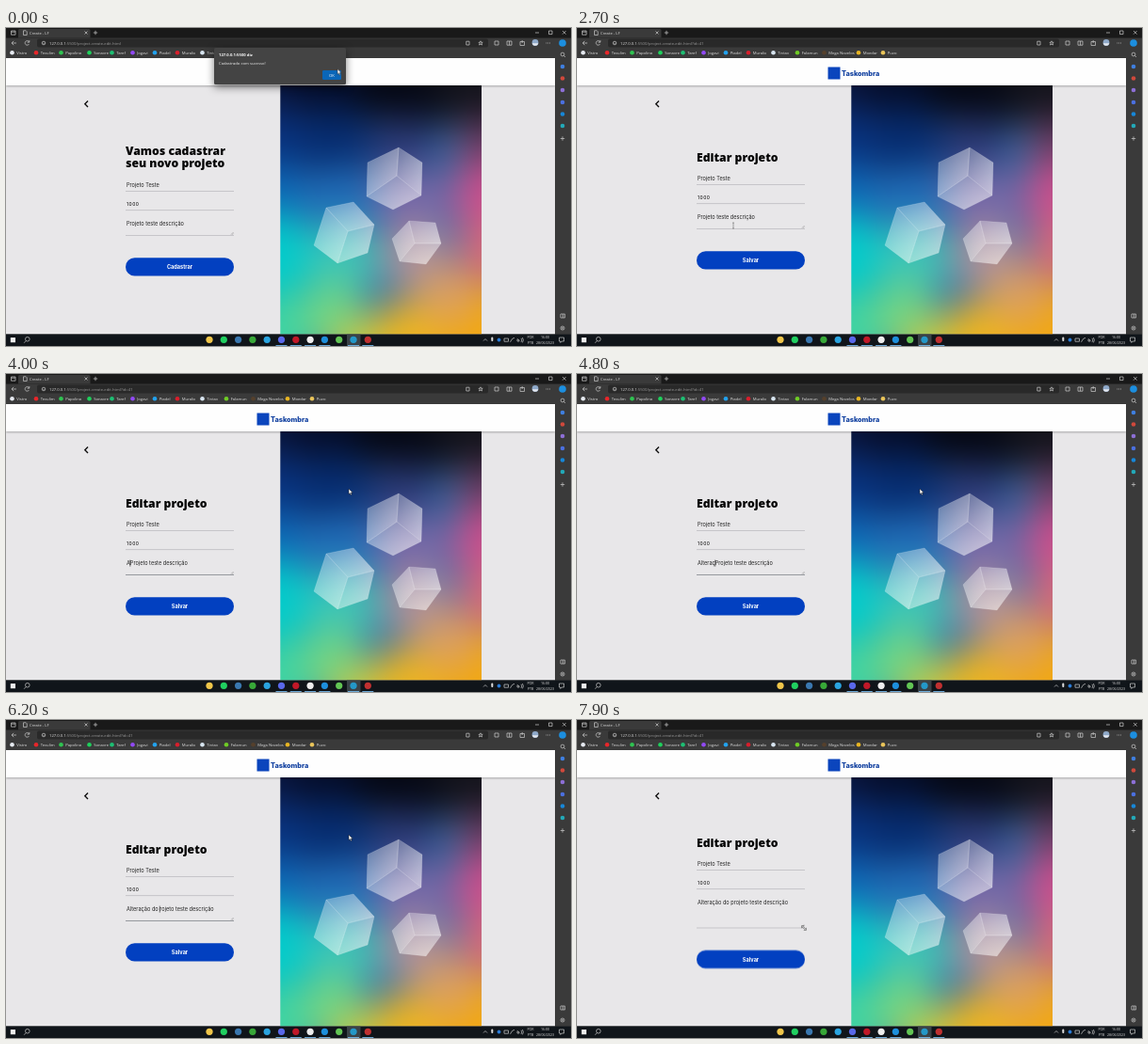
These frames come from a looping animation (600 by 338 pixels, 8 s). An HTML page:

```html
<!DOCTYPE html>
<html lang="pt-BR">
<head>
<meta charset="utf-8">
<title>Projetos</title>
<style>
html, body { margin: 0; width: 100%; height: 100%; overflow: hidden; background: #111; }
svg { display: block; width: 100vw; height: 100vh; }
text { font-family: Inter, "Open Sans", sans-serif; white-space: pre; }
.ui text, text.ui { font: 4.2px "Open Sans", "Noto Sans", sans-serif; fill: #ddd; }
.title { font: 800 12.2px "Open Sans", "Noto Sans", sans-serif; fill: #050505; }
.field { font-size: 5.6px; fill: #222; }
.old { font-size: 4.9px; font-weight: 500; letter-spacing: .5px; }
.label { font-size: 5.2px; fill: #aaa; }
.btn { font-size: 5.6px; font-weight: 700; fill: #fff; text-anchor: middle; }
.line { stroke: #bdbdc0; stroke-width: .8; }
.stroke { fill: none; stroke: #ccc; stroke-width: .7; }

/* scenes switch hard, so they share one stepped clock */
.step { opacity: 0; animation: 8s step-end infinite; }
.create { animation-name: create; }
.dialog { animation-name: dialog; }
.list { animation-name: list; }
.edit { animation-name: edit; }
.focus { animation-name: focus; }
.arrow { animation-name: arrow; }
.hand { animation-name: hand; }
.beam { animation-name: beam; }
.sizer { animation-name: sizer; }
@keyframes create { 0% { opacity: 1 } 6.25% { opacity: 0 } }
@keyframes dialog { 0% { opacity: 1 } 3.75% { opacity: 0 } }
@keyframes list { 0% { opacity: 0 } 6.25% { opacity: 1 } 24.3% { opacity: 0 } }
@keyframes edit { 0% { opacity: 0 } 24.3% { opacity: 1 } }
@keyframes focus { 0% { opacity: 0 } 40% { opacity: 1 } 93.75% { opacity: 0 } }
@keyframes arrow {
  0% { opacity: 1 } 17% { opacity: 0 } 24.3% { opacity: 1 }
  31.5% { opacity: 0 } 43.2% { opacity: 1 } 91.8% { opacity: 0 }
}
@keyframes hand { 0% { opacity: 0 } 17% { opacity: 1 } 24.3% { opacity: 0 } }
@keyframes beam { 0% { opacity: 0 } 31.5% { opacity: 1 } 43.2% { opacity: 0 } }
@keyframes sizer { 0% { opacity: 0 } 91.8% { opacity: 1 } }

.up { animation: up 8s linear infinite; }
.down { animation: down 8s linear infinite; }
@keyframes up {
  0%, 15% { transform: translateY(7px) }
  15.01%, 93.75% { transform: none }
  98.75%, 100% { transform: translateY(-7px) }
}
@keyframes down {
  0%, 15% { transform: translateY(7px) }
  15.01%, 93.75% { transform: none }
  98.75%, 100% { transform: translateY(7.5px) }
}
.pointer { animation: move 8s ease-in-out infinite; }
@keyframes move {
  0%, 5% { transform: translate(352px, 43.5px) }
  18%, 24.3% { transform: translate(433px, 132px) }
  32.5%, 34.4% { transform: translate(166px, 210px) }
  38.75%, 41.25% { transform: translate(128.5px, 202px) }
  47.5%, 80% { transform: translate(364px, 122px) }
  85.6%, 87.5% { transform: translate(175px, 258px) }
  91.9%, 93.75% { transform: translate(241px, 213px); animation-timing-function: linear }
  98.75%, 100% { transform: translate(241px, 221px) }
}
</style>
</head>
<body>
<svg viewBox="0 0 600 338" preserveAspectRatio="none">
  <defs>
    <filter id="soft" filterUnits="userSpaceOnUse" x="200" y="-30" width="400" height="450" color-interpolation-filters="sRGB">
      <feGaussianBlur stdDeviation="19"/>
    </filter>
    <filter id="shade" x="-10%" y="-30%" width="120%" height="170%" color-interpolation-filters="sRGB">
      <feDropShadow dx="0" dy="1" stdDeviation="1.1" flood-opacity=".28"/>
    </filter>
    <filter id="float" x="-20%" y="-50%" width="140%" height="220%" color-interpolation-filters="sRGB">
      <feDropShadow dx="0" dy="3" stdDeviation="4" flood-opacity=".5"/>
    </filter>
    <linearGradient id="glass" x1="0" y1="0" x2="1" y2="1">
      <stop offset="0" stop-color="#fff" stop-opacity=".28"/>
      <stop offset="1" stop-color="#fff" stop-opacity=".6"/>
    </linearGradient>
    <clipPath id="frame"><path d="M291.3 61H505V325.5H291.3z"/></clipPath>
  </defs>

  <!-- page -->
  <rect y="32" width="583" height="293.5" fill="#e8e7e9"/>
  <g clip-path="url(#frame)">
    <g id="blobs" filter="url(#soft)"><rect x="220" y="0" width="360" height="400" fill="#3a70a8"/></g>
    <g id="cubes" stroke="#fff" stroke-opacity=".3" stroke-width=".5"></g>
  </g>
  <path d="M87 77.5 83.8 80.8 87 84.1" fill="none" stroke="#111" stroke-width="1.4"/>

  <!-- form -->
  <g class="step create">
    <text class="title" x="127" y="135.2">Vamos cadastrar</text>
    <text class="title" x="127" y="148.2">seu novo projeto</text>
  </g>
  <g class="up">
    <text class="title step edit" x="127" y="141.5">Editar projeto</text>
    <text class="field" x="128" y="162">Projeto Teste</text>
    <path class="line" d="M127 166.5H242M127 186.6H242"/>
    <text class="field old" x="128" y="182.3">1000</text>
    <text class="field" x="128" y="203"><tspan id="typed"></tspan><tspan id="rest">Projeto teste descrição</tspan></text>
    <path id="caret" d="M0 197.6V204.6" stroke="#111" stroke-width=".6"/>
  </g>
  <g class="down">
    <path class="line" d="M127 213.5H242"/>
    <path class="step focus" d="M127 213.5H242" stroke="#8b8e93" stroke-width=".8"/>
    <path d="M239 212.6 241.5 210.1M240.5 212.6 241.5 211.6" stroke="#777" stroke-width=".5"/>
    <rect x="127" y="237.3" width="115" height="19.2" rx="9.6" fill="#0240c0"/>
    <text class="btn step create" x="184.5" y="249">Cadastrar</text>
    <text class="btn step edit" x="184.5" y="249">Salvar</text>
  </g>

  <!-- project list -->
  <g class="step list">
    <rect y="61" width="583" height="264.5" fill="#e8e7e9"/>
    <text class="title" x="78" y="93.5" style="font-size:11.5px">Projetos</text>
    <rect x="461" y="79.5" width="44" height="12.6" rx="6.3" fill="#0240c0"/>
    <text class="btn" x="483" y="87.5" style="font-size:4.6px">Novo Projeto</text>
    <rect x="78" y="106" width="427" height="40" rx="5" fill="#fcfcfc" filter="url(#shade)"/>
    <text class="label" x="88" y="118.7">Título</text>
    <text class="label" x="318" y="118.7">Custo Total</text>
    <text class="label" x="432.5" y="118.7">Ações</text>
    <text class="field" x="88" y="128.4" style="font-size:5px;font-weight:600">Projeto Teste</text>
    <text class="field" x="88" y="135.8" style="font-size:5px">Projeto teste descrição</text>
    <text class="field" x="318" y="132" style="font-size:4.9px;font-weight:600">1000</text>
    <path d="M432.5 134 433.2 131.6 437.4 127.4 439.2 129.2 435 133.4z" fill="#0c47b8"/>
    <path d="M444.6 128.1H450.2M446.4 127.2H448.4M445.2 128.6V133.2H449.6V128.6M446.8 130V132M448 130V132"
      fill="none" stroke="#d6303f" stroke-width=".9"/>
  </g>

  <!-- header -->
  <rect y="32" width="583" height="29" fill="#fefefe" filter="url(#shade)"/>
  <rect x="266.5" y="41.5" width="13" height="13" fill="#0b45bd"/>
  <text x="281" y="50.7" fill="#0c3c9e" style="font-size:7.3px;font-weight:800">Taskombra</text>
  <g class="step list" text-anchor="end">
    <text x="490" y="45.8" style="font-size:4.4px;font-weight:700">Morvel</text>
    <text x="490" y="50.6" fill="#444" style="font-size:3.8px">Desenvolvedor</text>
    <circle cx="500" cy="47" r="5.2" fill="#6f93ad"/>
    <path d="M495.2 49a5.2 5.2 0 0 0 9.6 0z" fill="#3d5a42"/>
    <path d="M498 50.5v-2.5a2 2 0 0 1 4 0v2.5z" fill="#26313c"/>
  </g>

  <!-- browser -->
  <g class="ui">
    <rect width="600" height="10.5" fill="#191919"/>
    <path d="M0 10.5H600V326H583V32H0z" fill="#3a3a3a"/>
    <path d="M13 10.5V2.5q0-1.5 1.5-1.5H88q1.5 0 1.5 1.5V10.5z" fill="#3a3a3a"/>
    <rect x="33" y="11.6" width="479" height="8.8" rx="2" fill="#292929"/>
    <path class="stroke" d="M5.5 3H10V7.2H5.5zM5.5 4.2H10M18.5 2.8H21.2L22.2 3.8V7.5H18.5zM83.5 3.5 86.5 6.5M86.5 3.5 83.5 6.5M92.8 5H97.2M95 2.8V7.2
      M562 5H566M576.5 3H580V6.6H576.5zM591 3 594.6 6.6M594.6 3 591 6.6
      M11 16H6M8.2 13.8 6 16 8.2 18.2M24.6 15A2.3 2.3 0 1 0 24.5 17M24.8 13V15.2H22.6
      M502 15.3H503.4L504 13.8 504.6 15.3H506.2L505 16.4 505.5 18 504 17 502.5 18 503 16.4z
      M532 14H537V18.2H532zM534.5 14V18.2M546 14.5H550.5V18.5H546zM548.2 16V13"/>
    <circle class="stroke" cx="40" cy="16" r="1.8"/><path class="stroke" d="M40 15.8V17"/>
    <path class="stroke" d="M488.8 14.2H492V18H488.8zM519 14H523V18H519z"/>
    <circle cx="562" cy="15.5" r="3.4" fill="#8fa9c9"/><path d="M558.7 16.2a3.4 3.4 0 0 0 6.6 0z" fill="#e5e8ee"/>
    <path d="M573.5 16H578" stroke="#ccc" stroke-dasharray=".8 1" stroke-width=".8"/>
    <g class="step list">
      <text x="25" y="6.6">List - LF</text>
      <text x="46" y="17.5">127.0.0.1<tspan fill="#999">:5500/list.html</tspan></text>
    </g>
    <g class="step create">
      <text x="25" y="6.6">Create - LF</text>
      <text x="46" y="17.5">127.0.0.1<tspan fill="#999">:5500/project-create-edit.html</tspan></text>
    </g>
    <g class="step edit">
      <text x="25" y="6.6">Create - LF</text>
      <text x="46" y="17.5">127.0.0.1<tspan fill="#999">:5500/project-create-edit.html?id=41</tspan></text>
    </g>
    <g id="marks"></g>
    <g id="side"></g>
    <path class="stroke" d="M592.3 29.2 594 31M588.8 117.5H593.2M591 115.3V119.7M589 304H593.5V308H589zM591.5 304V308"/>
    <circle class="stroke" cx="591" cy="28" r="1.9"/>
    <circle class="stroke" cx="591" cy="319" r="2"/><circle class="stroke" cx="591" cy="319" r=".6"/>
  </g>

  <!-- taskbar -->
  <g class="ui">
    <rect y="325.6" width="600" height="12.4" fill="#10151a"/>
    <rect x="362" y="325.6" width="14.5" height="12.4" fill="#3a4247"/>
    <rect x="4.8" y="329" width="5.2" height="5.2" fill="#eee"/>
    <circle class="stroke" cx="22.8" cy="330.7" r="2.3" stroke="#fff"/>
    <path class="stroke" d="M21.2 332.5 19.2 334.7M507 332.5 509 330.5 511 332.5M529 330H533.5V333.2H529zM543 333V330.6L545 331.8V333zM547 329.8q1.6 2 0 4M548.4 329q2 2.8 0 5.4M587.5 329H592.5V333H590L588.8 334.4V333H587.5z"/>
    <rect x="515.3" y="328.6" width="2" height="4.5" rx="1" fill="#ddd"/>
    <circle cx="523.5" cy="331.5" r="1.9" fill="#2b7bd6"/>
    <path class="stroke" d="M535.5 333.8q1.8-4.5 4.5-4.5"/>
    <path id="active" stroke="#76b9ed" stroke-width=".9"/>
    <g id="apps"></g>
    <g text-anchor="middle">
      <text x="557" y="330.4" style="font-size:3.6px">POR</text>
      <text x="557" y="335.8" style="font-size:3.6px">PTB</text>
      <text x="572.5" y="330.4" style="font-size:3.6px">16:00</text>
      <text x="572.5" y="335.8" style="font-size:3.6px">28/06/2023</text>
    </g>
  </g>

  <!-- alert -->
  <g class="step dialog ui">
    <rect x="221" y="21" width="140" height="39" rx="1.5" fill="#444" filter="url(#float)"/>
    <text x="226" y="30.3" style="font-weight:700;fill:#fff">127.0.0.1:5500 diz</text>
    <text x="226" y="39.3" style="fill:#eee">Cadastrado com sucesso!</text>
    <rect x="336" y="45" width="20" height="10" rx="1.2" fill="#0a66b8"/>
    <text x="346" y="51.6" text-anchor="middle" style="fill:#fff">OK</text>
  </g>

  <g class="pointer" stroke="#222" stroke-width=".5" fill="#fff">
    <path class="step arrow" d="M0 0V5.6L1.3 4.5 2.2 6.5 3.1 6.1 2.3 4.1H4z"/>
    <path class="step hand" d="M-.3 0q.7-.8 1.3 0V2.6L3.2 3.1Q4 3.4 3.8 4.4L3.2 6.6H.2L-1.9 4.1Q-1.5 3-.3 4z"/>
    <path class="step beam" d="M-1-3H1M0-3V3M-1 3H1" stroke="#555"/>
    <path class="step sizer" d="M-2.4-2.4H-.2L-.9-1.6 1.6.9 2.4.2V2.4H.2L.9 1.6-1.6-.9-2.4-.2z"/>
  </g>
</svg>
<script>
const $ = id => document.getElementById(id);
const fill = (id, items, draw) => $(id).insertAdjacentHTML('beforeend', items.map(draw).join(''));
const dot = (x, y, r, color) => `<circle cx="${x}" cy="${y}" r="${r}" fill="${color}"/>`;

fill('blobs', [
  [285, 50, 54, '#0a1640'], [355, 50, 56, '#050d2a'], [430, 50, 62, '#050814'], [512, 55, 58, '#14141c'],
  [285, 122, 38, '#08327f'], [350, 125, 40, '#062c70'], [422, 130, 36, '#2a3a78'], [512, 128, 34, '#6a3a60'],
  [285, 175, 32, '#0a68b8'], [355, 182, 36, '#1f6cb8'], [430, 185, 38, '#7868a8'], [514, 180, 40, '#cc4e8c'],
  [283, 242, 46, '#00cccc'], [357, 245, 40, '#3cc4b8'], [435, 242, 36, '#b0909a'], [515, 235, 34, '#dc6878'],
  [285, 325, 44, '#3cd4a4'], [345, 302, 36, '#6cd488'], [375, 340, 34, '#b8cc50'], [435, 332, 46, '#ecb420'],
  [512, 325, 55, '#f2a810'], [470, 285, 32, '#dca060']
], b => dot(...b));

// each cube: six outline corners, then the inner corner
fill('cubes', [
  ['417,127', '442,143', '441,178', '411,193', '383,179', '384,143', '415,157'],
  ['340,191', '369,185', '391,209', '384,239', '352,250', '327,231', '363,216'],
  ['428,205', '456,207', '462,229', '446,251', '418,248', '410,224', '434,229']
], c => [0, 2, 4].map(i =>
  `<polygon points="${[c[i], c[i + 1], c[(i + 2) % 6], c[6]].join(' ')}" fill="url(#glass)"/>`).join(''));

fill('marks', [
  [6.5, 'Vistro', '#e6eaf0'], [32, 'Tevulim', '#e8262a'], [58.5, 'Papolino', '#2fc351'], [88.5, 'Sonavre', '#1ed05c'],
  [112.5, 'Taref', '#1dbf73'], [134.5, 'Jogavi', '#9149f5'], [158, 'Piadel', '#22a2ee'], [182, 'Muralix', '#d81e2c'],
  [208.5, 'Tintav', '#d7e4ef'], [234, 'Falamun', '#6fcc25'], [262.5, 'Mega Novelos', '#55402c'],
  [299, 'Moedar', '#e8b522'], [325, 'Puvo', '#e9c45a']
], ([x, name, color]) => dot(x, 26.2, 2.3, color) + `<text x="${x + 4.7}" y="27.7">${name}</text>`);

fill('side', [
  [16, '#1c8fe0'], [41, '#3f7fe0'], [53.5, '#d0493c'], [66, '#8d6fd6'], [79, '#4b70e0'], [91.5, '#1787d8'], [104, '#23a9b8']
], ([y, color], i) => dot(591, y, i ? 2.3 : 3.8, color));

fill('apps', ['#f0c64a', '#20d060', '#3a78b0', '#38a838', '#2aa4e0', '#5a68ea', '#c01828', '#eeeeee', '#1d8fdc', '#62c554', '#2498c8', '#c03030'],
  (color, i) => dot(216 + 15.3 * i, 331.3, 3.6, color));
$('active').setAttribute('d', [5, 6, 7, 8, 10, 11].map(i => `M${210 + 15.3 * i} 337.5h12`).join(''));

const LOOP = 8000;
const prefix = 'Alteração de';
const tail = 'rojeto teste descrição';
// [time, text before the caret, text after it]
const keys = [
  [3200, '', 'P' + tail],
  ...[...prefix].map((_, i) => [3900 + i * 145, prefix.slice(0, i + 1), 'P' + tail]),
  [5700, 'Alteração d', 'P' + tail],
  [5850, 'Alteração do', 'P' + tail],
  [6000, 'Alteração do ', 'P' + tail],
  [6150, 'Alteração do ', tail],
  [6300, 'Alteração do p', tail]
];

let start;
function draw(now) {
  start ??= now;
  const t = (now - start) % LOOP;
  const [at, before, after] = keys.findLast(k => k[0] <= t) || [0, '', 'P' + tail];
  $('typed').textContent = before;
  $('rest').textContent = after;
  const x = 128 + (before ? $('typed').getComputedTextLength() : 0);
  const lit = t >= 3200 && t < 7300 && Math.floor((t - at) / 500) % 2 === 0;
  $('caret').setAttribute('transform', `translate(${x})`);
  $('caret').setAttribute('opacity', lit ? 1 : 0);
  requestAnimationFrame(draw);
}
requestAnimationFrame(draw);
</script>
</body>
</html>
```
